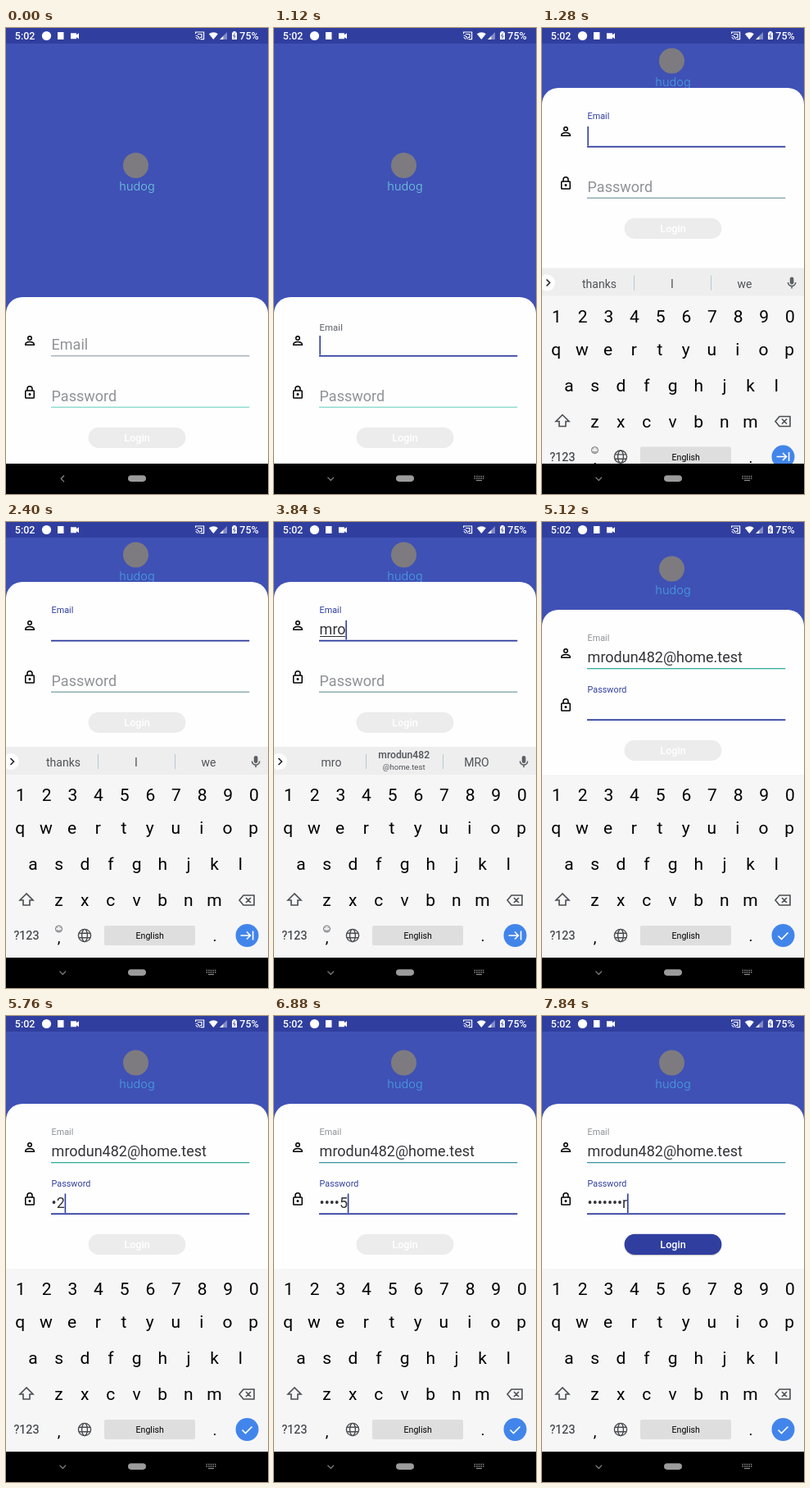
An HTML page for the animation above (8 s loop, 320x568 px).

```html
<!DOCTYPE html>
<html lang="en">
<head>
<meta charset="utf-8">
<title>Login screen</title>
<style>
  html, body { margin: 0; width: 100%; height: 100%; overflow: hidden; background: #3f51b5; }
  svg { display: block; width: 100%; height: 100%; font-family: Roboto, "Open Sans", sans-serif; }
  .mid { text-anchor: middle; }
  .status { font-size: 12.5px; font-weight: 500; fill: #fff; }
  .entry { font-size: 18px; fill: #333338; white-space: pre; }
  .keys { font-size: 21px; fill: #000; text-anchor: middle; }
  .strip { font-size: 14px; fill: #505357; text-anchor: middle; }
  .strip .upper { font-size: 12.2px; font-weight: 500; }
  .strip .lower { font-size: 9.6px; }
  .line { fill: none; stroke-width: 1.6; }
</style>
</head>
<body>
<svg viewBox="0 0 320 568" xmlns="http://www.w3.org/2000/svg">
  <rect width="320" height="568" fill="#3f51b5"/>

  <g id="logo">
    <circle cx="158.5" cy="167.5" r="15.5" fill="#7d7b7f"/>
    <text id="brand" class="mid" x="160" y="198" font-size="14.6" font-weight="300" style="font-family:Inter,sans-serif">hudog</text>
  </g>

  <g id="sheet">
    <rect y="328" width="320" height="600" rx="20" fill="#fefefe"/>
    <g fill="none" stroke="#000" stroke-width="2">
      <g transform="translate(20 372) scale(.75)">
        <circle cx="12" cy="8" r="3"/>
        <path d="M5 19V17.5C5 15.6 9 14 12 14S19 15.6 19 17.5V19Z"/>
      </g>
      <g transform="translate(20 435.2) scale(.75)">
        <rect x="5" y="9" width="14" height="12" rx="1"/>
        <path d="M8 9V6a4 4 0 0 1 8 0V9"/>
        <circle cx="12" cy="15" r="1" fill="#000"/>
      </g>
    </g>
    <g id="fields"></g>
    <rect id="caret" width="1.6" height="23.5" fill="#303f9f"/>
    <rect id="buttonShadow" x="101" y="488.3" width="118" height="25" rx="12.5" fill="#000" opacity=".18"/>
    <rect id="button" x="100.6" y="486.8" width="118.8" height="25.2" rx="12.6"/>
    <text class="mid" x="160" y="504.4" font-size="12.6" font-weight="500" fill="#fff">Login</text>
  </g>

  <g id="keyboard">
    <g id="strip">
      <rect y="274" width="320" height="35" fill="#eeeeef"/>
      <circle cx="6" cy="292" r="10" fill="#fff"/>
      <path d="M5.5 288l4 4-4 4" class="line" stroke="#222"/>
      <path d="M112.5 283v18M206.5 283v18" stroke="#b5c9cd"/>
      <g id="words" class="strip"></g>
      <rect x="302.8" y="285" width="4.6" height="9" rx="2.3" fill="#5c6064"/>
      <path d="M300.5 291.5a4.6 4.6 0 0 0 9.2 0M305.1 296v3" class="line" stroke="#5c6064"/>
    </g>
    <rect y="308" width="320" height="224" fill="#f6f6f7"/>
    <g id="keys" class="keys"></g>
    <path d="M25 453l-8 8h4v6h8v-6h4Z" class="line" stroke="#4a4d51"/>
    <path d="M290 455h13v12h-13l-5-6ZM293 458l6 6m0-6l-6 6" class="line" stroke="#4a4d51"/>
    <text class="mid" x="25" y="509" font-size="14.3" fill="#3d4044" stroke="#3d4044" stroke-width=".2">?123</text>
    <text class="mid" x="64.5" y="513" font-size="19">,</text>
    <text class="mid" x="255" y="511" font-size="19">.</text>
    <g id="emoji" fill="none" stroke="#55585c" stroke-width=".9">
      <circle cx="64.5" cy="496" r="4"/>
      <path d="M62.3 497a2.3 2 0 0 0 4.4 0M63 494v1m3-1v1"/>
    </g>
    <g fill="none" stroke="#4a4d51" stroke-width="1.4">
      <circle cx="96" cy="504" r="7.6"/>
      <ellipse cx="96" cy="504" rx="3.4" ry="7.6"/>
      <path d="M89 501.3h14M89 506.7h14"/>
    </g>
    <rect x="120" y="492" width="111" height="24" rx="2" fill="#dedede"/>
    <text class="mid" x="175.7" y="508" font-size="10.6">English</text>
    <circle cx="294.5" cy="504" r="14" fill="#4285ea"/>
    <path id="next" d="M286.5 504h12m-4.5-4.5l4.5 4.5-4.5 4.5M301.6 498.5v11" class="line" stroke="#fff"/>
    <path id="done" d="M288.5 504.5l4 4 8-8" class="line" stroke="#fff"/>
  </g>

  <rect width="320" height="19" fill="#303f9f"/>
  <text class="status" x="10.8" y="14">5:02</text>
  <circle cx="49.5" cy="9.5" r="5.6" fill="#fff"/>
  <rect x="63" y="5" width="7.5" height="9" fill="#fff"/>
  <path d="M79 6.3h7v2l3-2v7l-3-2v2h-7Z" fill="#fff"/>
  <path d="M231.6 7V5h10v8.7h-4M231.6 9a5 5 0 0 1 4.6 4.7M231.6 11.5a2.4 2.4 0 0 1 2.2 2.2M234 7.5h5v4h-2" fill="none" stroke="#fff" stroke-width="1.2"/>
  <path d="M247.8 7.2Q253.3 3.2 258.8 7.2L253.3 14ZM261 14l4.5-4.5V14Z" fill="#fff"/>
  <path d="M265.5 9.5L270 5v9h-4.5Z" fill="#fff" opacity=".4"/>
  <path d="M276 5.5h1.5V4h3v1.5h1.5V14h-6Z" fill="#fff"/>
  <path d="M279.6 6.5l-2 3.4h2.6l-2 3" fill="none" stroke="#303f9f" stroke-width=".9"/>
  <text class="status" x="285.3" y="14">75%</text>

  <rect y="531" width="320" height="37"/>
  <rect x="149" y="545.3" width="22" height="7.6" rx="3.8" fill="#9b9b9b"/>
  <path id="back" d="M71 545.5l-3.8 3.8 3.8 3.8" fill="none" stroke="#8d8d8d" stroke-width="1.2"/>
  <g id="navOpen" fill="none" stroke="#8a8a8a" stroke-width="1.2">
    <path d="M65.5 547.7l3.8 3.8 3.8-3.8"/>
    <path d="M244.5 546.5h12M244.5 549h12" stroke-width="1.5" stroke-dasharray="1.5 1.1"/>
    <path d="M247 551.5h7"/>
  </g>
</svg>
<script>
const LOOP = 8000;
const NAVY = '#303f9f';
const $ = id => document.getElementById(id);
const set = (node, attrs) => { for (const k in attrs) node.setAttribute(k, attrs[k]); };
const show = (node, on) => set(node, { visibility: on ? 'visible' : 'hidden' });
const ramp = (t, from, span) => Math.min(1, Math.max(0, (t - from) / span));
const smooth = p => (1 - Math.cos(Math.PI * p)) / 2;
const lerp = (a, b, p) => a + (b - a) * p;

function add(parent, tag, attrs, text = '') {
  const node = document.createElementNS('http://www.w3.org/2000/svg', tag);
  set(node, attrs);
  node.textContent = text;
  return parent.appendChild(node);
}

// The latest entry of a [[time, value], ...] list
const at = (list, t) => list.reduce((found, step) => t >= step[0] ? step : found);

// Keyboard letters: text, first x, baseline
[['1234567890', 18, 340], ['qwertyuiop', 17.3, 380], ['asdfghjkl', 33, 424], ['zxcvbnm', 64.5, 468]]
  .forEach(([row, x, y]) => [...row].forEach((key, i) => add($('keys'), 'text', { x: x + i * 31.66, y }, key)));

const words = [70, 159, 247.5].map(x => add($('words'), 'text', { x, y: 298 }));
const upper = add($('words'), 'text', { x: 158.7, y: 288.2, class: 'upper' }, 'mrodun482');
const lower = add($('words'), 'text', { x: 158.7, y: 301.5, class: 'lower' }, '@home.test');

function makeField(name, base) {
  const group = $('fields');
  return {
    base,
    label: add(group, 'text', { x: 55.6 }, name),
    entry: add(group, 'text', { x: 55.6, y: base, class: 'entry' }),
    line: add(group, 'rect', { x: 55, width: 242.3 })
  };
}
const email = makeField('Email', 392);
const password = makeField('Password', 454.5);
const composing = add($('fields'), 'rect', { x: 56, y: 394, height: 1, fill: '#333338' });

const FOCUS_EMAIL = 960, SLIDE = 1120, OPEN = 1280, READY = 1600;
const FOCUS_PASS = 4560, FLOAT_PASS = 4640, SECURE = 4800;
const emailSteps = [[0, ''], [2880, 'm'], [3200, 'mr'], [3520, 'mro'], [4320, 'mrodun482@home.test']];
const passTimes = [5280, 5600, 6080, 6400, 6720, 7040, 7360, 7680];
const passKeys = '123456er';
const suggestions = [[0, 'thanks,I,we'], [2880, 'm,my,me'], [3200, 'mr,,MR'], [3520, 'mro,,MRO'], [4320, 'to,a,the']];
const emailLine = [[0, '#98a2aa'], [FOCUS_EMAIL, NAVY], [FOCUS_PASS, '#22a690'], [6400, '#2b8d9f']];
const passLine = [[0, '#78d5c6'], [OPEN, '#709aa2'], [FOCUS_PASS, NAVY]];

function drawField(field, float, focused, text, color) {
  set(field.label, {
    y: lerp(field.base, field.base - 25.7, float),
    'font-size': lerp(18, 10.8, float),
    fill: !focused ? '#909297' : float > .95 ? NAVY : '#5e6169'
  });
  field.entry.textContent = text;
  const height = focused ? 1.8 : 1.2;
  set(field.line, { y: field.base + 7.7 - height / 2, height, fill: color });
}

function draw(t) {
  const onEmail = t >= FOCUS_EMAIL && t < FOCUS_PASS;
  const onPass = t >= FOCUS_PASS;
  const secure = t >= SECURE;
  const shift = t < OPEN ? 0 : secure ? 221 : 255;
  set($('sheet'), { transform: `translate(0 ${-shift})` });
  set($('logo'), { transform: `translate(0 ${-shift / 2})` });
  set($('brand'), { fill: t < OPEN ? '#70c9df' : '#489fdf' });

  const [emailTime, mail] = at(emailSteps, t);
  const count = passTimes.filter(time => t >= time).length;
  const secret = count ? '•'.repeat(count - 1) + passKeys[count - 1] : '';
  drawField(email, smooth(ramp(t, FOCUS_EMAIL, 200)), onEmail, mail, at(emailLine, t)[1]);
  drawField(password, smooth(ramp(t, FLOAT_PASS, 200)), onPass, secret, at(passLine, t)[1]);

  const typing = t >= 2880 && t < 4320;
  show(composing, typing);
  if (typing) set(composing, { width: email.entry.getComputedTextLength() - 1 });

  const active = onPass ? password : email;
  const lastInput = onPass
    ? (count ? passTimes[count - 1] : FOCUS_PASS)
    : Math.max(emailTime, t < READY ? FOCUS_EMAIL : READY);
  show($('caret'), (onEmail || onPass) && (t - lastInput) % 1000 < 500);
  set($('caret'), { x: 55.4 + active.entry.getComputedTextLength(), y: active.base - 17 });

  const enabled = count >= 6;
  set($('button'), { fill: enabled ? NAVY : '#ececec' });
  show($('buttonShadow'), enabled);

  const slide = 1 - ramp(t, SLIDE, 220);
  set($('keyboard'), { transform: `translate(0 ${258 * slide * slide})` });
  $('strip').style.display = secure ? 'none' : '';
  at(suggestions, t)[1].split(',').forEach((word, i) => { words[i].textContent = word; });
  const contact = t >= 3200 && t < 4320;
  show(upper, contact);
  show(lower, contact);
  show($('emoji'), !secure);
  show($('next'), !secure);
  show($('done'), secure);
  show($('back'), t < SLIDE);
  show($('navOpen'), t >= SLIDE);
}

function tick() {
  draw(performance.now() % LOOP);
  requestAnimationFrame(tick);
}
tick();
</script>
</body>
</html>
```
